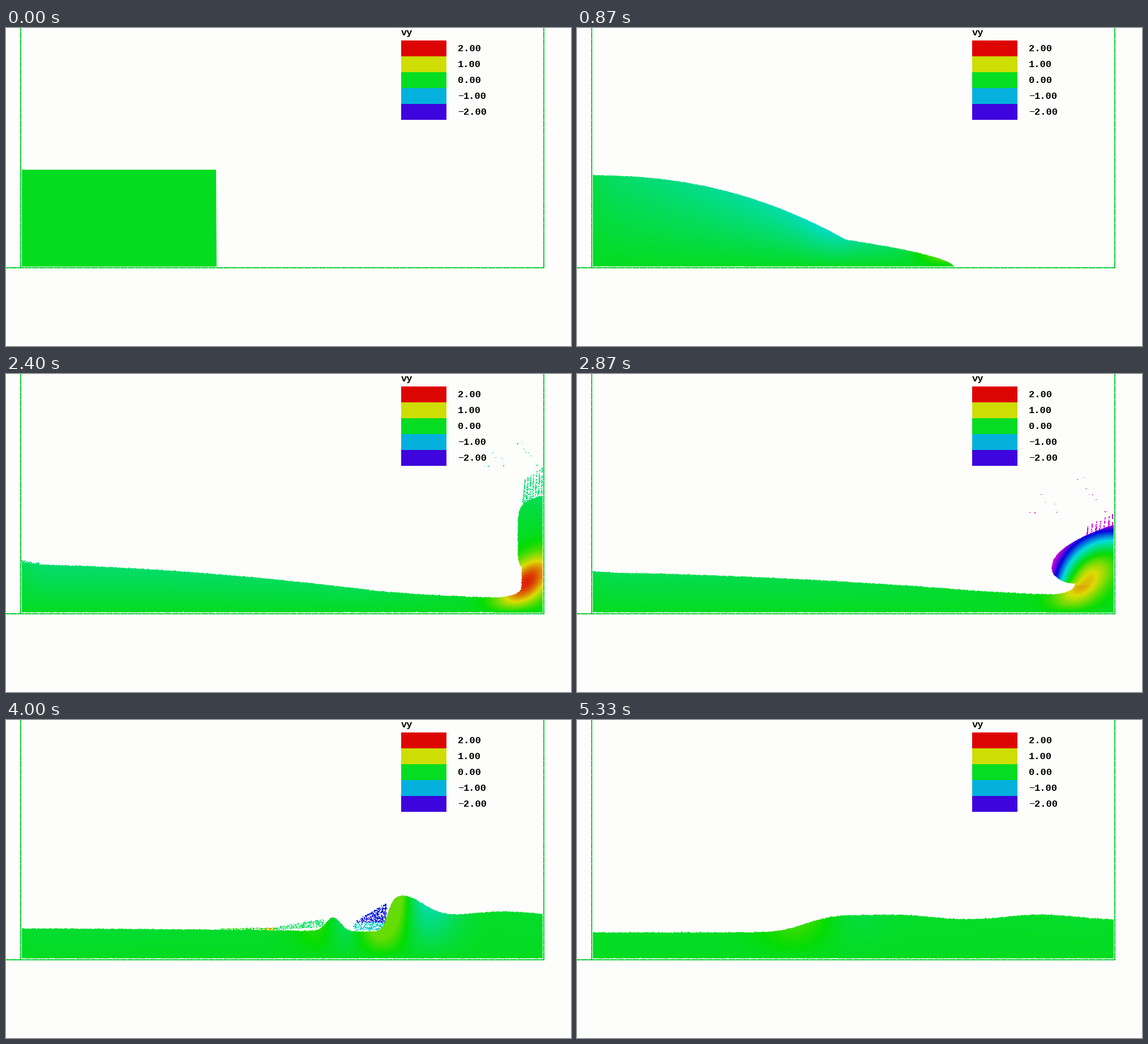
These frames come from a looping animation (998x561 px, 5390 ms). A matplotlib script:

```python
import numpy as np
import matplotlib.pyplot as plt
from matplotlib.animation import FuncAnimation
from matplotlib.colors import ListedColormap, Normalize, hsv_to_rgb
from matplotlib.patches import Rectangle
from matplotlib.path import Path

W, H, DPI = 998, 561, 64
FRAMES, LOOP, FPS = 81, 5390, 15
LEFT, RIGHT, FLOOR = 28, 948, 421
G, UNIT = 580, 115            # px/s^2, px/s per velocity unit
PT = 72 / DPI                 # points per pixel
VMIN, VMAX = -3.4, 5.0


def hue_color(v):
    """Velocity to colour: the hue runs round the wheel and wraps."""
    hue = ((128 - 64 * np.asarray(v, float)) / 360) % 1
    return hsv_to_rgb(np.stack([hue, np.full_like(hue, 0.98),
                                np.full_like(hue, 0.865)], -1))


cmap = ListedColormap(hue_color(np.linspace(VMIN, VMAX, 512)))
norm = Normalize(VMIN, VMAX)


def ramp(t, a, b):
    return np.clip((t - a) / (b - a), 0, 1)


def bell(x, width):
    return np.exp(-(x / width)**2)


def sigmoid(x):
    return 1 / (1 + np.exp(-np.clip(x, -50, 50)))


def collapse(x, t):
    """Depth of the slumping column: a convex part, a kink, a thin tongue."""
    left = 41 + 130 / (1 + (t / 1.93)**3.1)
    kink = 38 + 133 * np.exp(-t / 0.33) + 8 * ramp(t, 2.9, 4)
    right = np.interp(t, [1.45, 1.65, 2.9, 4], [0, 18, 31, 46])
    kink_x = min(371 + 120 * t, 760)
    tip_x = min(371 + 355 * t**1.3, RIGHT)
    u = np.clip((x - LEFT) / (kink_x - LEFT), 0, 1)
    w = np.clip((x - kink_x) / max(tip_x - kink_x, 0.1), 0, 1)
    bend = 1.6 + 0.45 / max(t, 0.1)**2
    tongue = 0.6 + 1.4 * ramp(t, 1.3, 1.6)
    lip = 8 * bell(t - 1.9, 0.7) * np.exp((LEFT - x) / 15)
    return lip + np.where(x < kink_x, kink + (left - kink) * (1 - u**bend),
                          right + (kink - right) * (1 - w)**tongue)


def depth(x, t):
    """Collapse plus the wave that returns from the right wall."""
    s = t - 4
    front = 673 - 208 * s
    wave = (79 - 4 * s + 4 * np.cos(2 * np.pi * (x - 880 + 45 * s) / 260)
            + min(34 * np.exp(-s / 0.75), 42) * bell(x - front - 30 - 25 * s, 50))
    splash = 24 * max(0, 1 - (s / 0.6)**2) * bell(x - 578 + 150 * s, 18)
    d = collapse(x, t) + splash
    return d + (wave - d) * sigmoid((x - front) / max(5, 5 + 11 * s))


# Wall jet: time, top, bulge width, bulge height, neck width, bluntness
JET = np.array([(1.43, 410, 4, 400, 4, 9), (1.6, 320, 11, 345, 11, 9),
                (2.0, 225, 28, 312, 24, 9), (2.4, 215, 44, 312, 37, 9),
                (2.87, 266, 110, 342, 68, 2), (3.5, 325, 190, 380, 150, 2),
                (4.0, 421, 250, 421, 250, 2)])


def jet_params(t):
    return [np.interp(t, JET[:, 0], c) for c in JET.T[1:]]


def jet_edge(t):
    """Left edge of the jet, from its top to the floor."""
    top, bulge, mid, neck, blunt = jet_params(t)
    y = np.linspace(top, FLOOR, 260)
    cap = bulge * (1 - (1 - ramp(y, top, mid))**blunt)
    belly = neck + (bulge - neck) * np.sqrt(1 - ramp(y, mid, mid + 28)**2)
    base = FLOOR - collapse(np.array([RIGHT]), t)[0]
    foot = 50 * np.exp(-np.clip(base - y, 0, None) / 5)
    return np.c_[RIGHT - np.where(y < mid, cap, belly) - foot, y]


GRID = (24, 950, 424, 40)
xs = np.arange(25.5, 950, 3)
gx, gy = np.meshgrid(xs, np.arange(41.5, 424, 3))
kernel = bell(np.arange(-30, 31), 13)
kernel /= kernel.sum()


def shallow_velocity(t):
    """Vertical speed that conserves volume below the moving surface."""
    dt = 0.08
    d = depth(xs, t)
    change = (depth(xs, t + dt) - depth(xs, max(t - dt, 0))) / (dt + min(t, dt))
    u = -3 * np.cumsum(change) / np.maximum(d, 15)
    stretch = np.convolve(np.gradient(u, 3), kernel, "same")
    z = np.minimum(np.clip(FLOOR - gy, 0, None), d)
    return np.clip(-z * stretch / UNIT, -0.95, 0.55) * ramp(t, 0, 0.3)


def velocity(t):
    v = shallow_velocity(t)
    active = ramp(t, 1.4, 1.5) * ramp(t, 4, 3.3)
    if active == 0:
        return v
    top, bulge, mid, neck, _ = jet_params(t)
    zone = active * sigmoid((gx - RIGHT + 1.3 * bulge) / 10)
    # Fluid turned upwards at the corner, along a slanted patch
    dx, dy = gx - 950 + 0.8 * neck, gy - 367
    turn = bell(dx - dy, 48) * bell(dx + dy, 34) if False else \
        bell((dx - dy) / 2**0.5, 62) * bell((dx + dy) / 2**0.5, 34)
    turn *= active * 9.4 / t**1.84 * np.tanh(np.clip(423 - gy, 0, None) / 14)
    # Free flight takes over away from the corner
    flight = max(3.8 - G / UNIT * (t - 1.6), -2.6)
    reach = np.hypot(gx - 945, gy - 375) / max(375 - top, 40)
    loose = zone * np.clip(reach, 0, 1)**3.5 * np.tanh(np.clip(375 - gy, 0, None) / 8)
    return (v * (1 - zone) + turn) * (1 - loose) + flight * loose


# Spray, placed as it is at its highest (t = 2.4 s)
rng = np.random.default_rng(4)
drops = np.c_[941 - 100 * rng.random(14)**2, 114 + 50 * rng.random(14)]
lane, rise = rng.integers(0, 7, 600), rng.random(600)**1.2
streak = np.c_[913 + 5.2 * lane + 4 * rise + rng.normal(0, 2, 600) * (1 - rise),
               240 - rise * (54 + 3.6 * lane)]
jet = np.vstack([drops, streak])
jet[:, 0] = np.minimum(jet[:, 0], 947)
jet_v = np.maximum(0.09 - 0.012 * (jet[:, 1] - 115), -0.35)

# Foam ahead of the returning wave (t = 4 s)
fall = np.sqrt(rng.random(700))
foam_x = 610 + 62 * fall
foam_h = rng.random(700) * (12 + 36 * fall)
foam_v = -1.95 + 0.5 * rng.random(700) + 0.9 * (foam_h < 14)
skim_x = 372 + 190 * rng.random(420)**0.6
far = ramp(skim_x, 470, 562)
skim_h = (6 + 17 * far) * (0.35 + 0.65 * rng.random(420))
skim_v = np.where(skim_x < 472, 0.2, -0.25) + rng.normal(0, 0.25, 420)
skim_v += 1.1 * bell(skim_x - 468, 8)
corner_x = LEFT + 32 * rng.random(45)**1.6
corner_h = 5 * rng.random(45)


def spray(t):
    """Position and velocity of every loose particle."""
    parts = []
    if t > 1.5:
        dt = t - 2.4
        x = 949 - (949 - jet[:, 0]) * (t - 1.35) / 1.05
        y = jet[:, 1] - UNIT * jet_v * dt + G * dt**2 / 2
        parts.append(np.c_[x, y, jet_v - G / UNIT * dt])
    if 3.45 < t < 4.5:
        size = 1 - abs(t - 4) / 0.55
        parts.append(np.c_[foam_x - 200 * (t - 4), 371 - foam_h * size, foam_v])
    if 3.4 < t < 4.75:
        size = np.interp(t, [3.4, 3.7, 4, 4.75], [0, 1.1, 1, 0])
        spread = min((t - 3.35) / 0.65, 1 + 0.4 * (t - 4))
        parts.append(np.c_[660 + (skim_x - 660) * spread, 373 - skim_h * size, skim_v])
    if 0.95 < t < 3:
        y = FLOOR - depth(corner_x, t) - corner_h * bell(t - 1.9, 0.7)
        parts.append(np.c_[corner_x, y, np.full(45, -0.4)])
    if not parts:
        return np.empty((0, 3))
    p = np.vstack(parts)
    return p[(p[:, 1] < FLOOR - 1) & (p[:, 0] > LEFT)]


fig = plt.figure(figsize=(W / DPI, H / DPI), dpi=DPI, facecolor="#fdfdfc")
ax = fig.add_axes([0, 0, 1, 1])
fluid = ax.imshow(np.zeros_like(gx), extent=GRID, cmap=cmap, norm=norm,
                  interpolation="bilinear", aspect="auto", zorder=3)
dots = ax.scatter([], [], s=(1.5 * PT)**2, c=[], cmap=cmap, norm=norm,
                  marker="s", linewidths=0, zorder=2)
ax.set(xlim=(0, W), ylim=(H, 0))
ax.axis("off")


def box(x, y, w, h, color):
    ax.add_patch(Rectangle((x, y), w, h, facecolor=color, lw=0, zorder=5))


def label(x, y, text, weight="bold"):
    ax.text(x, y, text, fontsize=17 * PT, family="Liberation Mono",
            weight=weight, va="baseline", color="black", zorder=6)


WALL, GAP = "#0ccd34", "#8fe8a0"
box(25.3, 0, 1.8, 424, WALL)
box(948.8, 0, 1.8, 424, WALL)
box(0, 422.4, 950.5, 1.8, WALL)
for d in range(6, 950, 13):
    box(d, 422.4, 1, 1.8, GAP)
    if d < 420:
        box(25.3, d, 1.8, 1, GAP)
        box(948.8, d, 1.8, 1, GAP)

label(698, 13, "vy")
for row, value in enumerate((2, 1, 0, -1, -2)):
    top = 22 + 28 * row
    box(698, top, 80, 28, hue_color(value))
    if value < 0:
        label(798, top + 19, "\u2212", "normal")
    label(798 + 10.2 * (value < 0), top + 19, f"{abs(value):.2f}")


def closed(points):
    return Path(np.vstack([points, points[:1]]), closed=True)


def draw(k):
    t = k / FPS
    noise = np.random.default_rng(k)
    rough = 0.6 * ramp(t, 0, 1.6)
    x = np.linspace(LEFT, RIGHT, RIGHT - LEFT + 1)
    d = depth(x, t)
    wet = (d > 2) * rough
    surface = FLOOR - d + wet * noise.normal(0, 1, x.size)
    floor = FLOOR - wet * abs(noise.normal(0, 1, x.size))
    clip = closed(np.r_[np.c_[x, surface], np.c_[x, floor][::-1]])
    if JET[0, 0] < t < JET[-1, 0]:
        edge = jet_edge(t)
        edge[:, 0] += noise.normal(0, rough, len(edge))
        edge = np.clip(edge, (LEFT, 0), (RIGHT, FLOOR))
        wall = [(RIGHT, edge[0, 1]), (RIGHT, FLOOR)]
        clip = Path.make_compound_path(clip, closed(np.r_[wall, edge[::-1]]))
    fluid.set_data(velocity(t))
    fluid.set_clip_path(clip, ax.transData)

    p = spray(t)
    dots.set_offsets(p[:, :2])
    dots.set_array(p[:, 2])
    return fluid, dots


anim = FuncAnimation(fig, draw, frames=FRAMES, interval=LOOP / FRAMES,
                     init_func=lambda: draw(0), repeat=True, repeat_delay=0,
                     blit=False)
plt.show()
```
